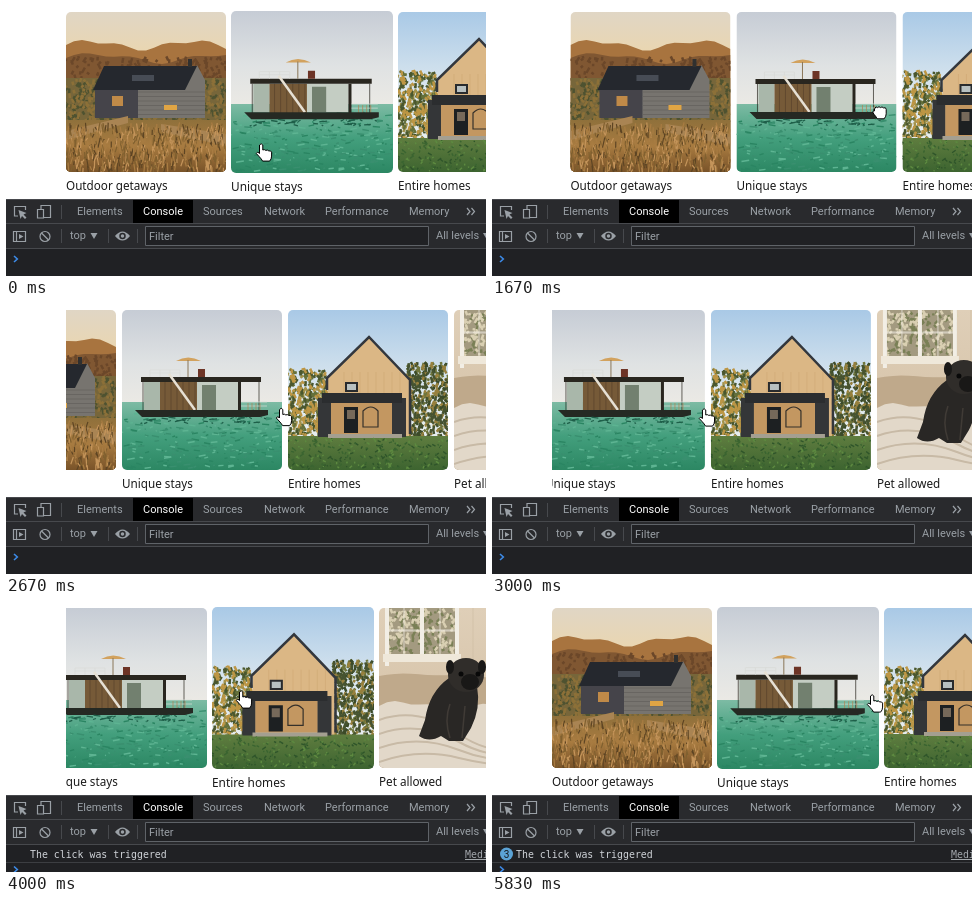
An HTML page for the animation above (5.99 s loop, 480 px wide and 270 px high).

```html
<!DOCTYPE html>
<html lang="en">
<head>
<meta charset="utf-8">
<style>
html, body { margin: 0; width: 100%; height: 100%; overflow: hidden; background: #fff; }
svg { display: block; width: 480px; height: 270px; }
text { white-space: pre; }
.label { font: 11.7px "Noto Sans", "Open Sans", sans-serif; fill: #1a1a1a; }
.ui { font: 11px Roboto, Arial, sans-serif; fill: #9aa0a6; }
.mono { font: 9.9px "DejaVu Sans Mono", monospace; fill: #d0d4d9; }
.icon { fill: none; stroke: #9aa0a6; stroke-width: 1.2; }
</style>
</head>
<body>
<svg id="stage" viewBox="0 0 480 270"></svg>
<script>
let seed = 7;
const rnd = () => (seed = seed * 16807 % 2147483647) / 2147483647;
const repeat = (n, f) => Array.from({ length: n }, (_, i) => f(i)).join('');
const shape = (fill, d) => `<path fill="${fill}" d="${d}"/>`;
const rect = (fill, x, y, w, h) => shape(fill, `M${x} ${y}h${w}v${h}h${-w}z`);
const line = (color, width, d) => `<path fill="none" stroke="${color}" stroke-width="${width}" d="${d}"/>`;
const text = (cls, x, y, s, extra = '') => `<text class="${cls}" x="${x}" y="${y}" ${extra}>${s}</text>`;
const fade = (id, ...colors) => `<linearGradient id="${id}" x2="0" y2="1">${colors.map((c, i) =>
  `<stop offset="${i / (colors.length - 1)}" stop-color="${c}"/>`).join('')}</linearGradient>`;

// Parts shared by the photos, each 160 by 160
const sky = id => rect(`url(#${id})`, 0, 0, 160, 160);
const ground = (fill, y) => rect(fill, 0, y, 160, 160 - y);
const ridge = (fill, y, amp, freq) => shape(fill, 'M0 160' + repeat(21, i =>
  `L${i * 8} ${(y - amp * (Math.sin(i * freq) + Math.sin(i * freq * 2.3) / 2)).toFixed(1)}`) + 'V160z');
const planks = (color, x, y, n, gap, h) => line(color, 0.7, repeat(n, i => `M${x + i * gap} ${y}v${h}`));
const boards = (color, x, y, n, gap, w) => line(color, 0.7, repeat(n, i => `M${x} ${y + i * gap}h${w}`));

// Short random strokes: grass, leaves, waves
const strokes = (color, width, x, y, w, h, n, dx, dy) => line(color, width, repeat(n, () =>
  `M${(x + rnd() * w).toFixed(1)} ${(y + rnd() * h).toFixed(1)}l${(dx * (rnd() - 0.5)).toFixed(1)} ${(dy * (0.4 + rnd())).toFixed(1)}`));
const leaves = (x, y, w, h, ...colors) => colors.map(c => strokes(c, 2.5, x, y, w, h, w * h / 28, 6, 4)).join('');

const farmhouse = () => sky('dusk') +
  ridge('#a8743f', 33, 4, 0.5) + ridge('#805732', 46, 4, 0.4) +
  leaves(0, 44, 160, 24, '#6b4729') + ground('#77663a', 66) + leaves(0, 66, 160, 46, '#4e5230', '#8c7038') +
  ground('url(#straw)', 108) +
  rect('#45444a', 29, 76, 44, 30) +
  shape('#77746f', 'M72 76H118L131 53L139 68V106H72z') + boards('#625f5c', 72, 80, 6, 4.5, 67) +
  shape('#25282e', 'M38 54H131L119 78H27z') + rect('#30302f', 122, 47, 4, 8) +
  boards('#8791a0', 66, 64, 3, 2, 22) +
  rect('#c08a48', 46, 84, 11, 10) + rect('#e0a544', 98, 93, 13, 5) +
  shape('#a98453', 'M0 119L62 104V111L0 128zM95 112L160 122V134L95 120z') +
  ['#5d4423', '#c4945a', '#80602f', '#a87c42'].map(c => strokes(c, 1.2, 0, 118, 160, 44, 150, 5, -7)).join('');

const houseboat = () => sky('haze') + ground('url(#sea)', 92) +
  ['#2a8562', '#5db492', '#398f6f'].map(c => strokes(c, 1.4, 0, 98, 160, 60, 90, 16, 1)).join('') +
  rect('#a9b7aa', 22, 72, 16, 28) + rect('#c4cdc3', 75, 72, 41, 28) + rect('#72806f', 80, 75, 14, 25) +
  rect('#765a38', 38, 72, 37, 29) + planks('#59432b', 43, 72, 6, 6, 29) +
  rect('#29261f', 19, 67, 120, 5) + planks('#29261f', 21, 72, 2, 116, 29) + rect('#29261f', 116, 72, 3, 29) +
  shape('#d2a25e', 'M54 51Q66 44 79 51z') + line('#8a7759', 1, 'M66 50V67') + rect('#6d3426', 76, 59, 7, 8) +
  boards('#d9dad7', 28, 60, 2, 3, 30) + planks('#d9dad7', 28, 60, 4, 10, 7) +
  line('#e6e0d4', 2.5, 'M47 64L73 100') +
  boards('#d8ddd6', 119, 92, 2, 4, 26) + planks('#b08354', 126, 93, 4, 4, 8) +
  shape('#252923', 'M13 100H146V105L138 107H20z') + strokes('#1e5f49', 1.3, 18, 107, 126, 6, 40, 14, 1);

const cabin = () => sky('blue') +
  leaves(0, 58, 38, 70, '#a3924a', '#64703a', '#4a572e', '#bd9644') +
  leaves(118, 52, 42, 76, '#6e753c', '#3b4a28', '#97803d', '#465330') +
  ground('url(#lawn)', 126) +
  shape('#dbb785', 'M40 68L81 28L121 69V126H40z') + planks('#d0aa76', 56, 62, 8, 8, 22) +
  line('#33373d', 2.5, 'M39 80V68L81 27L122 70V124') +
  rect('#292b2d', 57, 72, 13, 10) + rect('#b8c0c0', 59, 74, 9, 6) +
  rect('#343638', 30, 88, 13, 39) + rect('#343638', 104, 88, 14, 39) + rect('#c39761', 43, 92, 61, 32) +
  rect('#2b2d2f', 34, 83, 80, 10) + rect('#1d2022', 56, 97, 14, 26) + rect('#76695a', 59, 100, 8, 9) +
  line('#35302a', 1.2, 'M75 117V101Q83 93 90 101V117z') + rect('#a49f91', 40, 124, 74, 4) +
  ['#2f552a', '#5d8a40', '#3a6430'].map(c => strokes(c, 1.4, 0, 130, 160, 30, 80, 8, -2)).join('');

const pug = () => sky('linen') +
  rect('#a39a80', 8, 0, 72, 48) + leaves(8, 0, 70, 44, '#7a8056', '#d9cfb2') +
  planks('#f2eee5', 25, 0, 3, 18, 48) + boards('#f2eee5', 8, 22, 2, 1, 72) +
  line('#f2eee5', 4, 'M8 0V58M43 0V48M78 0V58') + rect('#efe8da', 4, 46, 78, 8) +
  planks('#cfbea5', 94, 0, 5, 15, 95) + ridge('#bfa98b', 68, 2, 0.3) + ridge('#e2d8c9', 98, 4, 0.5) +
  line('#c8baa6', 2, repeat(4, i => `M0 ${112 + i * 14}Q40 ${98 + i * 14} 80 ${126 + i * 8}T160 ${132 + i * 8}`)) +
  shape('#292725', 'M70 70Q50 84 46 112L40 128Q50 135 62 128L70 133H84L92 120Q102 100 98 78z') +
  line('#403b36', 1.5, 'M71 96Q65 112 71 130M86 98L83 130') +
  `<g fill="#191817"><ellipse cx="87" cy="67" rx="18" ry="17" fill="#302d2a"/><ellipse cx="91" cy="74" rx="9" ry="8"/>` +
  [71, 103].map(x => `<ellipse cx="${x}" cy="59" rx="4" ry="7"/>`).join('') +
  [82, 99].map(x => `<circle cx="${x}" cy="66" r="2.5" fill="#080808"/>`).join('') + '</g>';

const cards = [['Outdoor getaways', farmhouse], ['Unique stays', houseboat], ['Entire homes', cabin], ['Pet allowed', pug]];
const tabs = [[71, 'Elements'], [137, 'Console'], [197, 'Sources'], [258, 'Network'], [319, 'Performance'], [403, 'Memory']];
const arrow = x => shape('#9aa0a6', `M${x} 227h7l-3.5 6z`);

const devtools = () =>
  rect('#202124', 0, 193, 480, 77) + rect('#292a2d', 0, 193, 480, 50) + rect('#000', 127, 194, 60, 23) +
  line('#47494d', 1, 'M0 193.5H480M0 217.5H480M0 242.5H480M55.5 199v14M55.5 223v14M102.5 223v14M131.5 223v14') +
  tabs.map(([x, s]) => text('ui', x, 209, s, s == 'Console' ? 'style="fill:#fff"' : '')).join('') +
  `<g class="icon"><path d="M12 210H8.5V200.5h11V204M461 202l3 3.5-3 3.5M465.5 202l3 3.500-3 3.500"/>
    <path d="M35 203v-3.500h9.500v12H38M31.500 203.500h6v8.500h-6z"/><path d="M7.500 225.500h12v10h-12zM10.500 225.500v10"/>
    <circle cx="39" cy="230.500" r="5"/><path d="M35.500 227l7 7"/></g>` +
  shape('#9aa0a6', 'M12.500 204l8 3-3 1.500 3 3-1.500 1.500-3-3-1.500 3zM13 228l4.500 2.500-4.500 2.500zM109 230q7.500-9 15 0-7.500 9-15 0z') +
  '<circle cx="116.500" cy="230" r="2.500" fill="#9aa0a6" stroke="#292a2d" stroke-width="1.500"/>' +
  text('ui', 64, 233, 'top') + arrow(84.5) + arrow(477) +
  '<path d="M139.500 220.500h283v19h-283z" fill="#202124" stroke="#5f6368"/>' +
  text('ui', 143, 234, 'Filter') + text('ui', 430, 233, 'All levels') +
  `<g id="message">${text('mono', 24, 256, 'The click was triggered')}
    ${text('mono', 459, 256, 'Medi', 'text-decoration="underline" style="fill:#a4a9ae"')}
    ${line('#3c3e42', 1, 'M0 260.5H480')}
    <g id="badge"><circle cx="14.500" cy="252" r="6.500" fill="#5ba3d6"/>
    ${text('ui', 14.5, 255.5, '', 'id="count" text-anchor="middle" style="fill:#16191d;font-size:10px"')}</g></g>` +
  '<path id="prompt" d="M8 250l3.300 3-3.300 3" fill="none" stroke="#3d8be8" stroke-width="1.600"/>';

// Pointing and closed hand, drawn around their middle
const point = 'M-4.5-7q1.7-2.5 3.3 0v5q1.5-1 3 .4 1.6-.9 3 .5 2-.5 2.8 1.2v4q0 3-2 5h-7q-1-2-3.5-4.6l-2.8-3q.8-2.2 2.8-.6l.4.6z';
const grab = 'M-5.5-3q1.400-3.600 3-1.400 1.500-1.800 3 0 1.500-1.600 3 .3 2.400-1 2.700 1.400v4.500q0 2.500-2 5h-7.200q-.6-2-3-4.500-2.400-3.500.5-3.400z';

document.getElementById('stage').innerHTML =
  `<defs>${fade('dusk', '#e0d6c5', '#f3d69c', '#a8743f')}${fade('straw', '#8f703b', '#a87b40', '#795329')}
  ${fade('haze', '#c6ccd5', '#dfe2e3', '#efece5', '#efece5')}${fade('sea', '#7dbba4', '#439f7d', '#2c8763')}
  ${fade('blue', '#a9c9e6', '#dde8ef', '#eef0ee')}${fade('lawn', '#5f7d3f', '#3d6430')}${fade('linen', '#dfcfb8', '#d2bea2')}
  <clipPath id="round"><rect width="160" height="160" rx="5"/></clipPath>
  <clipPath id="view"><path d="M60 0H480V193H60z"/></clipPath></defs>
  <path d="M0 0H480V270H0z" fill="#fff"/><g clip-path="url(#view)">` +
  cards.map(([name, photo]) => `<g class="card"><g transform="translate(0 6)" clip-path="url(#round)">${photo()}</g>
    ${text('label', 0, 184, name)}</g>`).join('') +
  `</g>${devtools()}<path id="hand" stroke="#000" fill="#fff" stroke-linejoin="round"/>`;

const el = id => document.getElementById(id);
const cardEls = document.querySelectorAll('.card');
const HOME = 60, PITCH = 166;

// Cursor moves: first and last step, then where each one ends
const moves = [
  { from: 2, to: 10, x: 388, y: 106 }, { from: 12, to: 19.1, x: 203, y: 113 },
  { from: 20, to: 22, x: 238, y: 97 }, { from: 31, to: 35, x: 383, y: 101 }
];

function cursor(n) {
  let x = 258, y = 146;
  for (const m of moves) {
    const u = Math.min(1, Math.max(0, (n - m.from) / (m.to - m.from)));
    const k = u * u * (3 - 2 * u);
    x += (m.x - x) * k;
    y += (m.y - y) * (1 - (1 - k) ** 3);
  }
  return { x, y };
}

// Left edge of the first card
function scroll(n, x) {
  const pull = Math.max(0, x - 287) * 0.183;           // pulled past the start
  if (n <= 10) return HOME + pull;
  if (n < 12) return HOME + pull * Math.exp(2 * (10 - n)); // springs back
  if (n < 20) return HOME + x - 388;
  if (n < 31) return HOME - 185;
  return HOME - 185 * (383 - x) / 146;                 // flung back
}

function draw(ms) {
  const n = Math.min(35, Math.floor((ms % 5990 + 4) * 6 / 1000));
  const { x, y } = cursor(n), left = scroll(n, x);
  const pulling = n > 4 && n <= 10;
  const dragging = pulling || (n >= 12 && n < 20) || (n >= 31 && n < 35);
  const tip = x - 3.5 - left;
  cardEls.forEach((card, i) => {
    const hover = !dragging && tip >= PITCH * i && tip < PITCH * i + 160;
    card.setAttribute('transform', `translate(${left + PITCH * i} 0)` +
      (hover ? 'translate(80 92) scale(1.0125) translate(-80 -92)' : ''));
  });
  el('hand').setAttribute('d', pulling ? grab : point);
  el('hand').setAttribute('transform', `translate(${x} ${y})`);

  const clicks = [24, 27, 31].filter(step => n >= step).length;
  el('message').style.display = clicks ? '' : 'none';
  el('badge').style.display = clicks > 1 ? '' : 'none';
  el('count').textContent = clicks;
  el('prompt').setAttribute('transform', `translate(0 ${clicks ? 14.5 : 0})`);
}

const start = performance.now();
function tick() {
  draw(performance.now() - start);
  requestAnimationFrame(tick);
}
tick();
</script>
</body>
</html>
```
